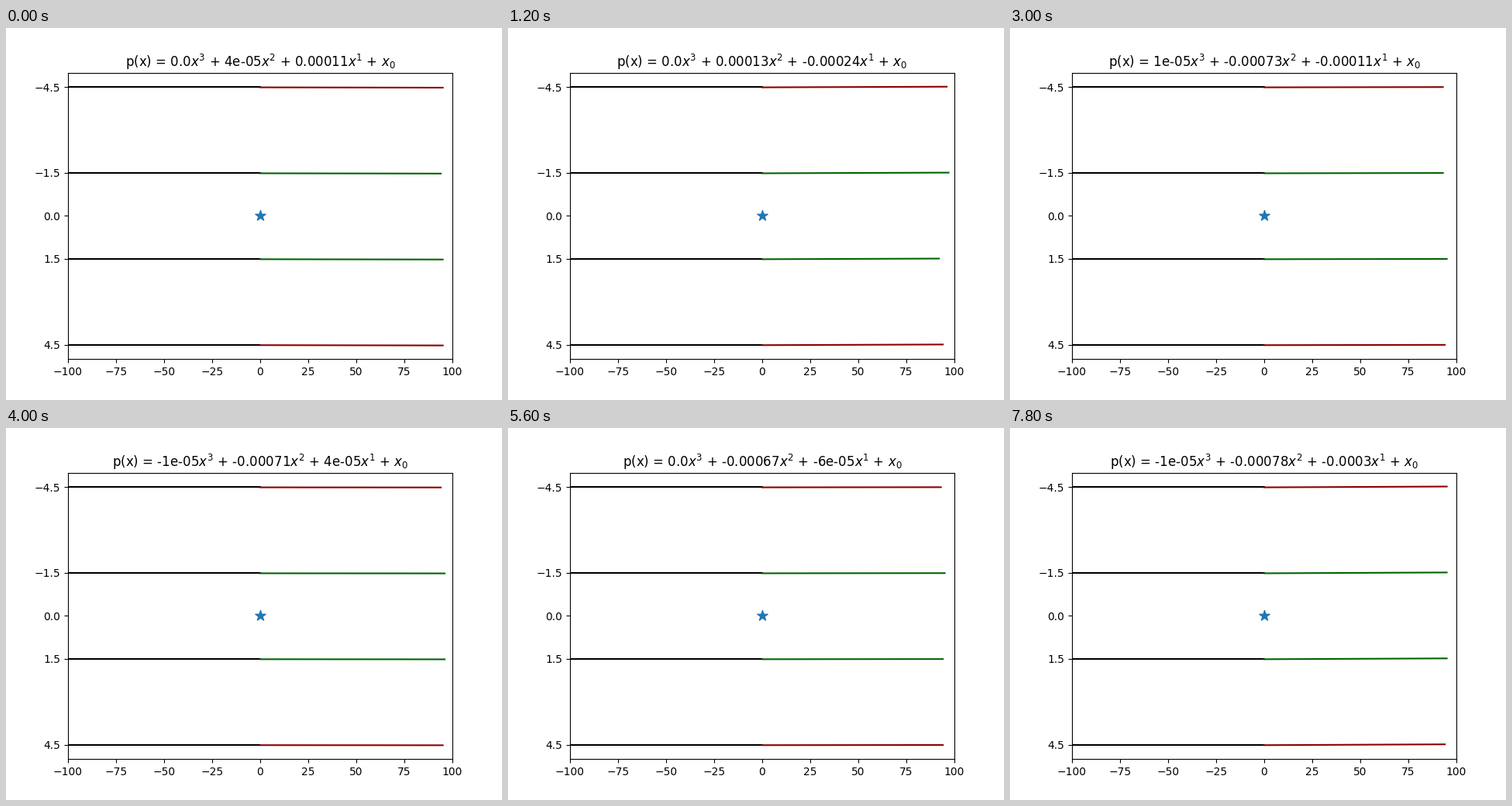
Animation of 640x480 px, one loop 8 s. Source, as a matplotlib script:

```python
import numpy as np
import matplotlib.pyplot as plt
from matplotlib.animation import FuncAnimation

FRAMES, STEP = 40, 200
UNIT = 1e-5
LANES = (-4.5, -1.5, 1.5, 4.5)
COLORS = ("darkred", "darkgreen", "darkgreen", "darkred")
BIAS = 0.0135  # half a pixel below the lane

# Key points of the drifting coefficients, in units of 1e-5
TIMES = (0, 6, 15, 20, 28, 34, 39)
CUBIC = (0, 0, 1, -1, 0, -2, -1)
SQUARE = (4, 13, -73, -71, -67, -42, -78)
LINEAR = (11, -24, -11, 4, -6, -16, -30)


def coefficients(i):
    return [round(int(np.rint(np.interp(i, TIMES, keys))) * UNIT, 5)
            for keys in (CUBIC, SQUARE, LINEAR)]


def visible_ranges(i):
    """How far ahead each lane is seen, in whole units."""
    rng = np.random.default_rng(i)
    return np.clip(np.rint(rng.normal(94.6, 1.2, len(LANES))), 91, 98)


fig, ax = plt.subplots(figsize=(6.4, 4.8), dpi=100)
ax.set_xlim(-100, 100)
ax.set_ylim(5, -5)
ax.set_yticks([-4.5, -1.5, 0, 1.5, 4.5])

for y in LANES:
    ax.plot([-100, 0], [y, y], color="black")
ahead = [ax.plot([], [], color=c)[0] for c in COLORS]
ax.scatter(0, 0, s=100, marker="*", color="C0")
title = ax.set_title("", pad=5.3)


def update(i):
    a, b, c = coefficients(i)
    for line, y, end in zip(ahead, LANES, visible_ranges(i)):
        line.set_data([0, end], [y + BIAS, y + BIAS + c * end])
    title.set_text(f"p(x) = {a}$x^3$ + {b}$x^2$ + {c}$x^1$ + $x_0$")
    return [*ahead, title]


anim = FuncAnimation(fig, update, frames=FRAMES, interval=STEP,
                     repeat=True, repeat_delay=0)
plt.show()
```
